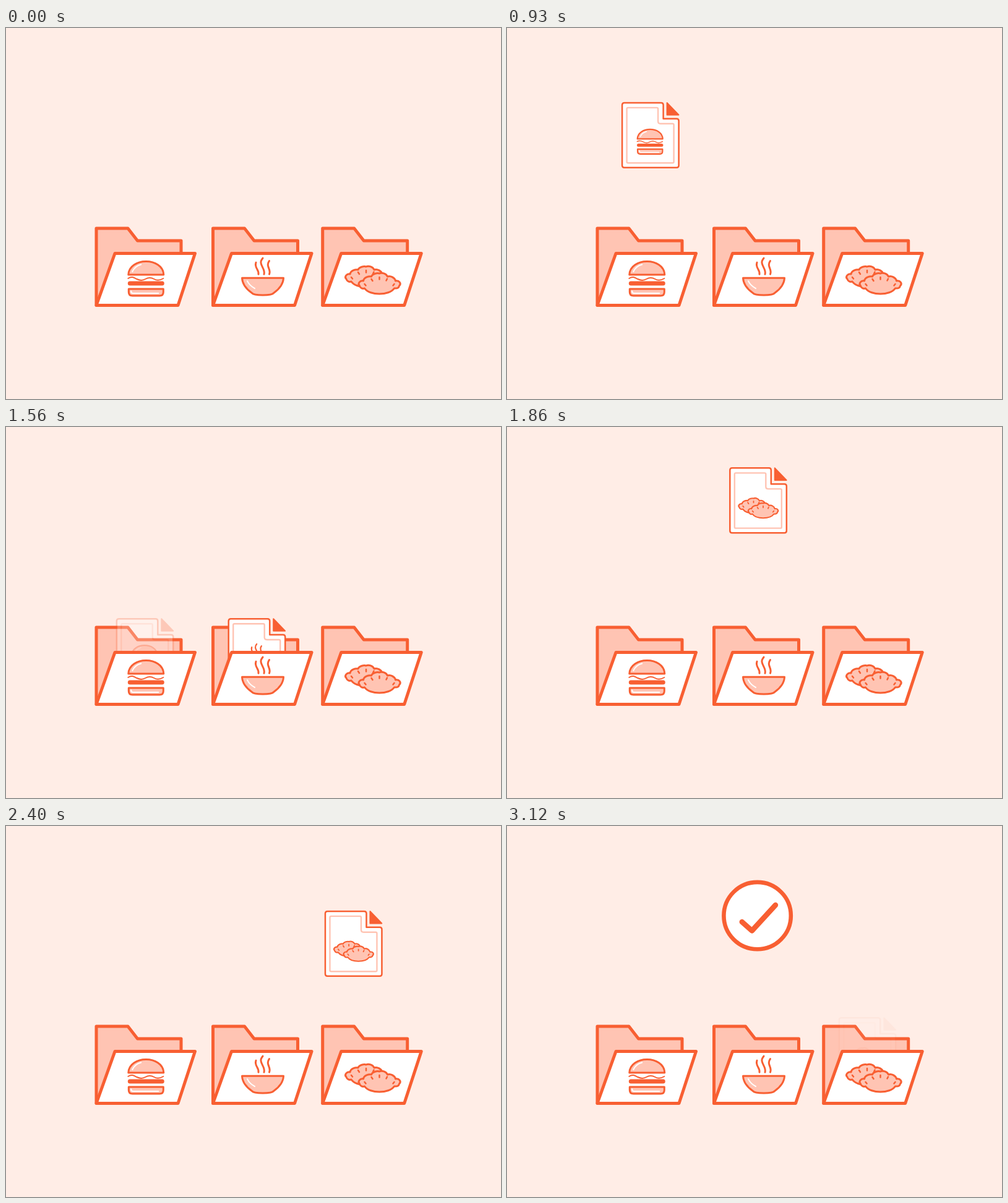
Write an HTML page that moves like this. It is 800 by 600 pixels and loops after 3.42 s.

```html
<!DOCTYPE html>
<html lang="en">
<head>
<meta charset="utf-8">
<title>Sorting food files</title>
<style>
  html, body { margin: 0; width: 100%; height: 100%; overflow: hidden; background: #ffede6; }
  svg { display: block; width: 800px; height: 600px; }
  .line { fill: none; }
  .soft { fill: #ffc4b3; }
  .paper { fill: #fff; }
  .shine { fill: none; stroke: #fff; stroke-width: 2; }
</style>
</head>
<body>
<svg viewBox="0 0 800 600" stroke="#f85f32" stroke-width="3" stroke-linecap="round" stroke-linejoin="round">
  <defs>
    <g id="burger">
      <path class="soft" d="M-28.5-6C-28-20-14-27.5 0-27.5S28-20 28.5-6Z"/>
      <path class="shine" d="M-22-11Q-18-20-8-22.5"/>
      <path class="line" stroke-width="2" d="M-29 0c6-4 10-1 14 1s9 3 14 0s9-3 14 0s10 2 15-1"/>
      <path class="line" stroke-width="7" d="M-26 8H26"/>
      <path class="soft" d="M-28 17H28V22q0 6-6 6H-22q-6 0-6-6Z"/>
      <path class="shine" d="M-24 20.5v.5q0 3 3 3H20"/>
    </g>
    <g id="bowl">
      <path class="soft" d="M-33.5 0H33.5C33 12 25 19 18 24C14 29-14 29-18 24C-25 19-33 12-33.5 0Z"/>
      <path class="shine" d="M-25 5Q-22 12-13 17"/>
      <path class="line" d="M-11-25c-3 9 5 11 4 19M0-32C-9-22 5-16 2-6M10.5-27.5C4-19 14-14 10.5-6"/>
    </g>
    <g id="dumpling">
      <path class="soft" d="M-32 4C-36 0-31-5-26-4C-25-10-17-12-13-11C-11-16-3-17 0-16C4-18 11-16 13-11C18-13 25-9 26-4C32-5 36 0 32 4C31 9 26 8 24 8C16 20-16 20-24 8C-27 9-31 8-32 4Z"/>
      <path class="line" stroke-width="2.5" d="M-24 1l2 2.5M-13-7l2 3M0-10v3.5M12.5-7.5l-1.5 3M24 1l-2 2.5"/>
    </g>
    <g id="pastry">
      <use href="#dumpling" x="-11" y="-6"/>
      <use href="#dumpling" x="10.5" y="5"/>
    </g>
    <path id="back" class="soft" stroke-width="5" d="M146 448V324H197L212.5 344H283V366"/>
    <path id="front" class="paper" stroke-width="5" d="M176 364.5H305.5L278 448.5H146Z"/>
    <g id="sheet">
      <path class="paper" stroke-width="2.5" d="M5 1.2H64.5q3.5 0 3.5 3.5V27H89.5q3.5 0 3.5 3.5V102.5q0 3.5-3.5 3.5H5q-3.5 0-3.5-3.5V4.7Q1.5 1.2 5 1.2Z"/>
      <path class="line" stroke="#ffc4b3" stroke-width="2.4" d="M11 9.2H57.5q2 0 2 2V31q0 4 4 4H83q2 0 2 2V96.5q0 2-2 2H11q-2 0-2-2V11.2q0-2 2-2Z"/>
      <path fill="#f85f32" stroke-width="2" d="M74 1.2L92.8 20.8H74Z"/>
    </g>
  </defs>

  <use href="#back"/>
  <use href="#back" x="188.5"/>
  <use href="#back" x="365.7"/>

  <g id="doc0"><use href="#sheet"/><use href="#burger" transform="translate(46.6 64) scale(.72)"/></g>
  <g id="doc1"><use href="#sheet"/><use href="#bowl" transform="translate(47 65.3) scale(.73)"/></g>
  <g id="doc2"><use href="#sheet"/><use href="#pastry" transform="translate(47.6 66.2) scale(.72)"/></g>

  <use href="#front"/>
  <use href="#front" x="188.5"/>
  <use href="#front" x="365.7"/>
  <use href="#burger" x="226.3" y="405"/>
  <use href="#bowl" x="415" y="404.2"/>
  <use href="#pastry" x="593" y="408"/>

  <g id="done">
    <circle class="paper" r="54.2" stroke-width="6.6"/>
    <path class="line" stroke-width="8.6" d="M-24.8 10L-8.7 24.3L29.3-17.3"/>
  </g>
</svg>
<script>
const LOOP = 3420, STEP = 30, LAST = 3120;
const el = id => document.getElementById(id);

// Keys are [time, value] pairs; each stretch between them eases in and out.
function ease(t, ...keys) {
  let [t0, v0] = keys[0];
  for (const [t1, v1] of keys) {
    if (t < t1) {
      const p = Math.max(0, (t - t0) / (t1 - t0 || 1));
      return v0 + (v1 - v0) * p * p * (3 - 2 * p);
    }
    [t0, v0] = [t1, v1];
  }
  return v0;
}

const ramp = (t, from, to) => Math.min(1, Math.max(0, (t - from) / (to - from)));

function place(id, x, y, opacity) {
  el(id).setAttribute("transform", `translate(${x} ${y})`);
  el(id).setAttribute("opacity", opacity);
}

function draw(t) {
  place("doc0",
    ease(t, [508, 358.7], [988, 177.3]),
    ease(t, [0, -109], [485, 119.7], [991, 119.7], [1381, 309]),
    1 - ramp(t, 1380, 1620));
  place("doc1",
    358.2,
    ease(t, [1080, -109], [1560, 309]),
    1 - ramp(t, 1560, 1800));
  place("doc2",
    ease(t, [2070, 358.8], [2490, 535.3]),
    ease(t, [1640, 9.5], [2120, 136.7], [2490, 136.7], [2900, 309]),
    ramp(t, 1620, 1710) * (1 - ramp(t, 2890, 3130)));
  const size = ease(t, [2700, 0], [2940, 1.31], [3120, 1]);
  el("done").setAttribute("transform", `translate(404.6 145.1) scale(${size})`);
  el("done").setAttribute("opacity", size > 0 ? 1 : 0);
}

const start = performance.now();
function tick() {
  const t = (performance.now() - start) % LOOP;
  draw(Math.min(LAST, Math.floor(t / STEP) * STEP));
  requestAnimationFrame(tick);
}
tick();
</script>
</body>
</html>
```
